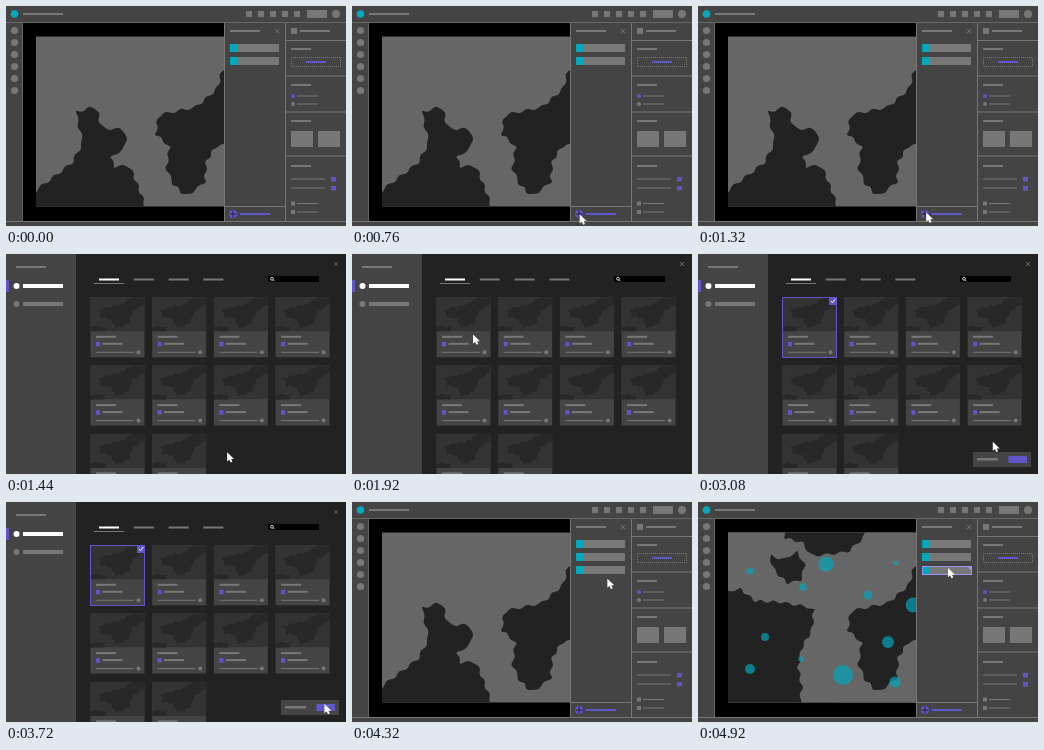
Recreate the animation shown at these times as an HTML page with a canvas. Size 340x220 px, loop 6400 ms.

```html
<!DOCTYPE html>
<html lang="en">
<head>
<meta charset="utf-8">
<title>Layer picker</title>
<style>
html, body { margin: 0; width: 100%; height: 100%; overflow: hidden; background: #444; }
canvas { display: block; width: 340px; height: 220px; }
</style>
</head>
<body>
<canvas id="stage"></canvas>
<script>
const W = 340, H = 220, LOOP = 6400;
const PANEL = '#444', GREY = '#777', DARK = '#222', LAND = '#666';
const CYAN = '#00a9bb', PURPLE = '#6155ca', WHITE = '#fff';

const canvas = document.getElementById('stage');
const ctx = canvas.getContext('2d');
const dpr = window.devicePixelRatio || 1;
canvas.width = W * dpr;
canvas.height = H * dpr;
ctx.scale(dpr, dpr);

const clamp = v => Math.max(0, Math.min(1, v));
const ease = u => u < 0.5 ? 4 * u ** 3 : 1 - 4 * (1 - u) ** 3;

function rect(x, y, w, h, color = GREY) {
  ctx.fillStyle = color;
  ctx.fillRect(x, y, w, h);
}

function dot(x, y, r, color = GREY) {
  ctx.fillStyle = color;
  ctx.beginPath();
  ctx.arc(x, y, r, 0, Math.PI * 2);
  ctx.fill();
}

function line(color, width, ...pts) {
  ctx.strokeStyle = color;
  ctx.lineWidth = width;
  ctx.beginPath();
  for (let i = 0; i < pts.length; i += 2) ctx.lineTo(pts[i], pts[i + 1]);
  ctx.stroke();
}

function polygon(color, ...pts) {
  ctx.fillStyle = color;
  ctx.beginPath();
  for (let i = 0; i < pts.length; i += 2) ctx.lineTo(pts[i], pts[i + 1]);
  ctx.fill();
}

function frame(x, y, w, h, color) {
  ctx.strokeStyle = color;
  ctx.lineWidth = 1;
  ctx.strokeRect(x + 0.5, y + 0.5, w - 1, h - 1);
}

function cross(x, y) {
  line(GREY, 0.8, x - 2, y - 2, x + 2, y + 2);
  line(GREY, 0.8, x - 2, y + 2, x + 2, y - 2);
}

// Splits every edge into short steps that swing to either side.
function ripple(keys, step, swing) {
  const pts = [];
  keys.forEach(([x, y], i) => {
    const [nx, ny] = keys[(i + 1) % keys.length];
    const dx = nx - x, dy = ny - y, len = Math.hypot(dx, dy);
    const n = Math.max(1, Math.round(len / step));
    for (let j = 0; j < n; j++) {
      const side = (pts.length % 2 ? swing : -swing) / len;
      pts.push([x + dx * j / n - dy * side, y + dy * j / n + dx * side]);
    }
  });
  return pts;
}

// Closed shape with a soft, wavy coast around a few key points.
function coast(keys, color = DARK, step = 7, swing = 2.5) {
  const pts = ripple(keys, step, swing);
  ctx.fillStyle = color;
  ctx.beginPath();
  for (let i = 0; i <= pts.length; i++) {
    const [x, y] = pts[i % pts.length], [nx, ny] = pts[(i + 1) % pts.length];
    const mx = (x + nx) / 2, my = (y + ny) / 2;
    if (i) ctx.quadraticCurveTo(x, y, mx, my);
    else ctx.moveTo(mx, my);
  }
  ctx.fill();
}

const WEST = [[20, 215], [30, 184], [66, 157], [77, 136], [69, 106], [90, 101],
  [96, 122], [119, 124], [120, 141], [105, 150], [107, 161], [124, 160], [139, 198], [139, 215]];
const EAST = [[230, 55], [217, 62], [211, 83], [190, 101], [153, 109], [149, 128],
  [164, 140], [160, 162], [167, 178], [180, 190], [199, 177], [200, 156], [210, 140], [230, 138]];
const BAY = [[20, 215], [28, 90], [42, 86], [56, 99], [82, 100], [116, 106],
  [114, 128], [104, 145], [100, 165], [104, 185], [100, 215]];
const CAPE = [[84, 15], [86, 36], [104, 40], [114, 54], [150, 50], [167, 34], [167, 15]];
const ISLE = [[72, 53], [86, 58], [98, 48], [107, 62], [104, 78], [90, 82], [76, 68]];

const BUBBLES = [
  [128, 62, 7.5], [52, 69, 3.4], [198, 61, 2.3], [105, 85, 3.8],
  [170, 93, 4.5], [215, 103, 7.4], [67, 135, 4], [190, 140, 6],
  [103, 157, 2.7], [52, 167, 5], [145, 173, 10], [197, 180, 5.5]];

function artwork(shown) {
  ctx.save();
  ctx.beginPath();
  ctx.rect(30, 30.5, 188, 170);
  ctx.clip();
  rect(30, 30, 188, 171, LAND);
  coast(WEST);
  ctx.globalAlpha = shown;
  rect(30, 30, 188, 171, LAND);
  [BAY, CAPE, ISLE].forEach(keys => coast(keys));
  ctx.globalAlpha = 1;
  coast(EAST);
  ctx.globalAlpha = 0.68 * shown;
  for (const [x, y, r] of BUBBLES) dot(x, y, r, CYAN);
  ctx.restore();
}

function settings() {
  rect(285, 22, 6, 6);
  rect(294, 24, 30, 2);
  for (const y of [34, 69.5, 105.5, 149.5]) rect(280, y, 60, 1);
  for (const y of [42, 78, 114, 159]) rect(285, y, 20, 2);

  ctx.setLineDash([1, 1]);
  ctx.lineDashOffset = 0.5;
  frame(285, 51, 50, 10, GREY);
  ctx.setLineDash([]);
  rect(300, 55, 20, 2, PURPLE);

  dot(287, 90, 2, PURPLE);
  dot(287, 98, 2);
  for (const y of [89.5, 97.5]) rect(291, y, 21, 1);
  for (const x of [285, 312]) rect(x, 125, 22, 16);
  for (const y of [173, 182]) {
    rect(285, y - 0.5, 34, 1);
    rect(325, y - 2, 5, 4.4, PURPLE);
  }
  for (const y of [195.5, 204]) {
    rect(285, y, 4, 4);
    rect(291, y + 1.5, 21, 1);
  }
}

function editor(rows, shown) {
  rect(0, 0, W, H, PANEL);
  rect(17, 17, 201, 198, '#000');
  artwork(shown);

  rect(0, 16, W, 1, LAND);
  rect(16, 17, 1, 198, LAND);
  rect(218, 17, 1, 198);
  rect(279, 17, 1, 198);
  rect(0, 215, W, 1);

  dot(8.5, 8, 3.8, CYAN);
  rect(17, 7, 40, 2);
  for (let i = 0; i < 5; i++) rect(240 + i * 12, 5, 6, 6);
  rect(301, 4, 20, 8);
  dot(330, 8, 4);
  for (let i = 0; i < 6; i++) dot(8.5, 24.5 + i * 12, 3.6);

  rect(224, 24, 30, 2);
  cross(271, 25);
  for (let i = 0; i < rows; i++) {
    const y = 38 + i * 13;
    rect(224, y, 49, 8);
    rect(224, y, 8, 8, CYAN);
  }
  if (shown > 0) {
    ctx.globalAlpha = shown;
    frame(224, 64, 50, 9, '#9d93ff');
    polygon('#9d93ff', 269, 64, 274, 64, 274, 69);
    ctx.globalAlpha = 1;
  }

  rect(219, 200, 60, 1);
  dot(227, 208, 4, PURPLE);
  line(DARK, 1, 223.5, 208, 230.5, 208);
  line(DARK, 1, 227, 204.5, 227, 211.5);
  rect(234, 207, 30, 2, PURPLE);
  settings();
}

const THUMB = [[46, -3], [31, 7], [8, 12], [10, 20], [21, 21], [24, 31],
  [38, 26], [42, 14], [54, 7], [56, -3]];

function card(x, y) {
  ctx.save();
  ctx.translate(x, y);
  rect(0, 0, 54, 60, PANEL);
  ctx.beginPath();
  ctx.rect(0, 0, 54, 34);
  ctx.clip();
  rect(0, 0, 54, 34, '#333');
  coast(THUMB, '#282828', 4, 1.5);
  coast([[-3, 29], [14, 29], [16, 38], [-3, 38]], '#282828', 4, 1.5);
  ctx.restore();

  rect(x + 5.5, y + 38.5, 20, 2);
  rect(x + 5.5, y + 44.5, 4, 4.5, PURPLE);
  rect(x + 12, y + 45.5, 20, 2);
  rect(x + 5.5, y + 54.5, 38, 1);
  dot(x + 48, y + 55, 2);
}

function picker(chosen) {
  rect(0, 0, W, H, DARK);
  rect(0, 0, 70, H, PANEL);
  rect(10, 12, 30, 2);
  rect(0, 26, 3, 12, PURPLE);
  dot(10.5, 32, 3, WHITE);
  rect(17, 30, 40, 4, WHITE);
  dot(10.5, 50, 3);
  rect(17, 48, 40, 4);

  cross(330, 10);
  for (let i = 0; i < 4; i++) rect(93 + i * 34.8, 24.5, 20, 2, i ? GREY : WHITE);
  rect(88, 29, 30, 1);
  rect(262, 22, 51, 6, '#000');
  ctx.strokeStyle = WHITE;
  ctx.lineWidth = 0.8;
  ctx.beginPath();
  ctx.arc(266, 24.8, 1.4, 0, Math.PI * 2);
  ctx.stroke();
  line(WHITE, 0.8, 267, 25.8, 268.4, 27.2);

  for (let i = 0; i < 10; i++) {
    card(84.5 + (i % 4) * 61.7, 43.3 + Math.floor(i / 4) * 68.3);
  }

  if (!chosen) return;
  frame(84, 43, 55, 61, PURPLE);
  rect(131, 43, 8, 8, PURPLE);
  line(WHITE, 1, 133, 47, 134.5, 48.7, 137.3, 45);
  rect(275, 198, 58, 15, PANEL);
  rect(279, 204, 21, 2.5);
  rect(310.5, 202, 18.5, 7, PURPLE);
}

const MOVES = [
  { start: 180, span: 740, x: 230, y: 208.7 },
  { start: 1150, span: 1110, x: 107, y: 64 },
  { start: 2250, span: 1200, x: 319.5, y: 204 },
  { start: 3560, span: 1040, x: 250, y: 66 }];

function cursor(t) {
  let x = 172, y = 201;
  for (const move of MOVES) {
    const k = ease(clamp((t - move.start) / move.span));
    x += (move.x - x) * k;
    y += (move.y - y) * k;
  }
  ctx.save();
  ctx.globalAlpha = clamp((t - 180) / 160);
  ctx.translate(x, y);
  polygon(WHITE, 0, 0, 0, 9.2, 2.1, 7.3, 3.5, 10.3, 5.3, 9.5, 4, 6.7, 6.9, 6.7);
  ctx.restore();
}

const OPEN = 1400, PICK = 2120, CLOSE = 3800, REVEAL = 4560, DONE = 4920;

function draw(t) {
  if (t >= OPEN && t < CLOSE) picker(t >= PICK);
  else editor(t < CLOSE ? 2 : 3, clamp((t - REVEAL) / (DONE - REVEAL)));
  if (t >= 200) cursor(t);
}

const born = performance.now();
function tick() {
  draw((performance.now() - born) % LOOP);
  requestAnimationFrame(tick);
}
tick();
</script>
</body>
</html>
```
